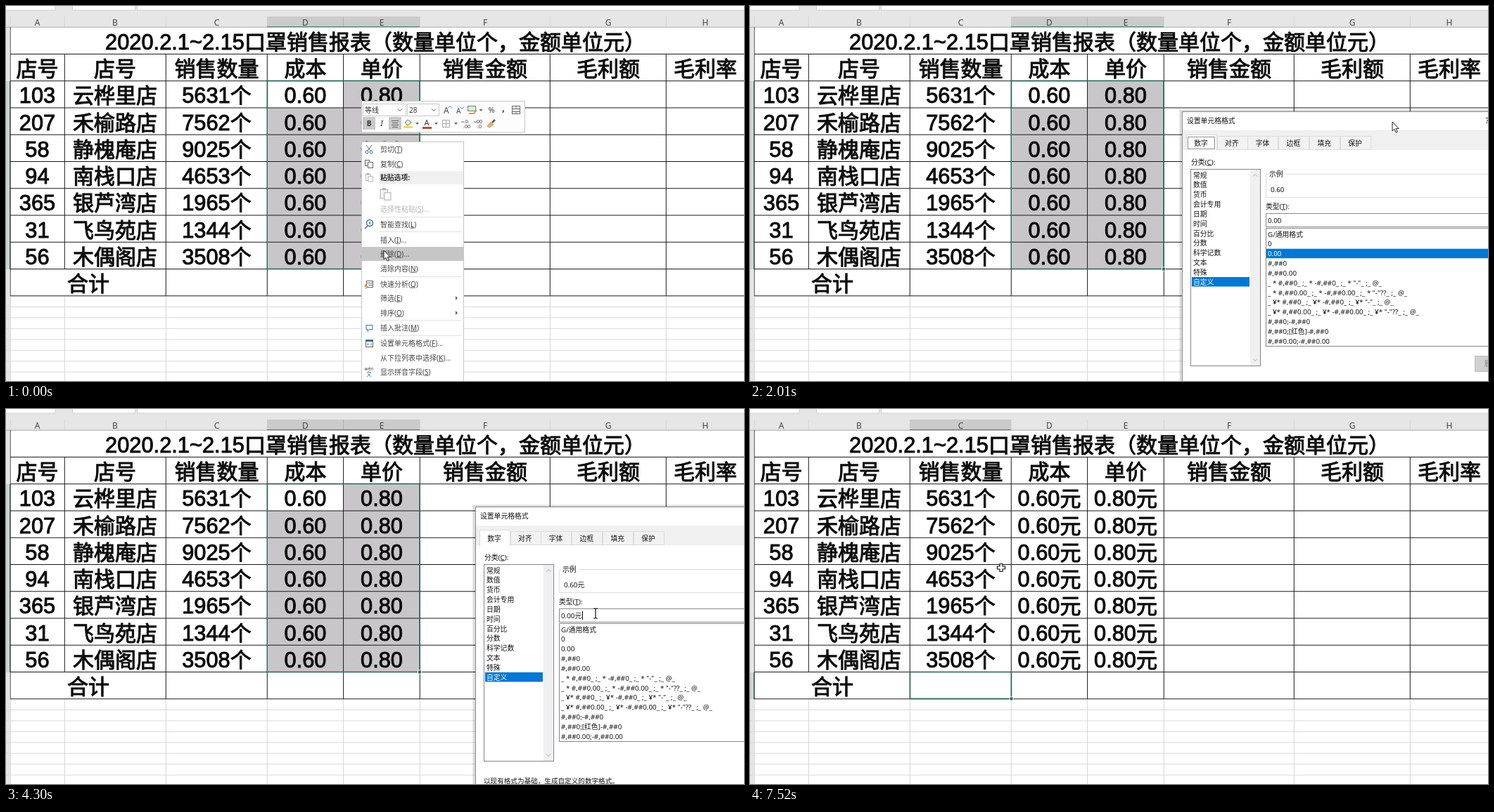
These frames come from a looping animation (1049 px wide and 534 px high, 7.58 s). An HTML page:

```html
<!DOCTYPE html>
<html lang="zh-CN">
<head>
<meta charset="utf-8">
<style>
html, body { margin: 0; width: 100%; height: 100%; overflow: hidden; background: #fff; }
svg { display: block; font-family: "Noto Sans", "Noto Sans CJK SC", "Noto Sans CJK", sans-serif; }
.cell { font-family: "Liberation Sans", "Noto Sans CJK SC", "Noto Sans CJK", sans-serif; stroke: #0c0c0c; stroke-width: 1; }
</style>
</head>
<body>
<svg id="stage" width="1049" height="534" viewBox="0 0 1049 534" fill="none"></svg>
<script>
const LOOP = 7580, GREEN = '#2b6b5b', BLUE = '#0078d7';
const MENU_END = 840, DIALOG_START = 900, DRAG_START = 1670, FOCUS = 3250, TYPED = 3900, OK = 6080, SELECT = 6960;

// Markup helpers; text is placed by its vertical centre.
const rect = (x, y, w, h, fill = 'none', stroke = 'none') =>
  `<rect x="${x}" y="${y}" width="${w}" height="${h}" fill="${fill}" stroke="${stroke}"/>`;
const path = (d, stroke, width = 1, fill = 'none') =>
  `<path d="${d}" stroke="${stroke}" stroke-width="${width}" fill="${fill}"/>`;
const text = (x, y, s, size = 9.8, color = '#111', attrs = '') =>
  `<text x="${x}" y="${y + size * .36}" font-size="${size}" fill="${color}" ${attrs}>` +
  s.replace(/\((\w)\)/, '(<tspan text-decoration="underline">$1</tspan>)') + '</text>';
const middle = 'text-anchor="middle"';
const group = (id, body) => `<g id="${id}">${body}</g>`;
const chevron = (x, y, up, color = '#555') => path(`M${x - 3} ${y + (up ? 1.5 : -1.5)}l3 ${up ? -3 : 3}l3 ${up ? 3 : -3}`, color);

const cols = [6, 83, 227, 371, 479.3, 588, 773, 938, 1051];
const colMid = [44.5, 155, 299.5, 425.5, 534, 681, 856, 994];
const rowY = i => 30.2 + 38.26 * i;
const heads = ['店号', '店号', '销售数量', '成本', '单价', '销售金额', '毛利额', '毛利率'];
const shops = [
  [103, '云桦里店', 5631], [207, '禾榆路店', 7562], [58, '静槐庵店', 9025], [94, '南栈口店', 4653],
  [365, '银芦湾店', 1965], [31, '飞鸟苑店', 1344], [56, '木偶阁店', 3508]];

// Digits sit slightly larger than the Chinese characters beside them.
const cellText = s => String(s).replace(/[\d.~]+/, '<tspan font-size="30.8">$&</tspan>');

function sheet() {
  let s = rect(0, 0, 1049, 534, '#fff') + rect(0, 0, 1049, 30, '#e6e6e6') + rect(0, 30, 6, 504, '#e6e6e6');
  for (const [x, w] of [[-1, 71], [94.5, 89], [186.5, 870]]) s += rect(x, -2, w, 8, '#fff', '#cfcfcf');
  for (let y = 428.5; y < 534; y += 15.45) s += path(`M0 ${y}H1049`, '#dadada');
  for (const x of cols) s += path(`M${x + .3} 413V534M${x + .3} 15V30`, '#d4d4d4');
  s += group('rangeFill',
    rect(371, 15, 217, 15, '#cbcbcb') + path('M479.5 15V30', '#b0b0b0') + path('M371 29.5H588', GREEN) +
    rect(0, 107, 5, 268, '#d2d2d2') + path('M5.5 107V375', GREEN) +
    rect(373, 108, 214, 266, '#c8c6c8') + rect(373, 108, 106, 37, '#fff'));
  s += group('totalFill',
    rect(227, 15, 144, 15, '#cbcbcb') + path('M227 29.5H371', GREEN) +
    rect(0, 375, 5, 38, '#d2d2d2') + path('M5.5 375V413', GREEN));
  s += path('M0 30.2H1049', '#a8a8a8') + path('M6.3 30V413', '#555');
  for (let i = 1; i <= 10; i++) s += path(`M6 ${rowY(i)}H1049`, '#1a1a1a');
  cols.slice(1).forEach((x, i) => s += path(`M${x + .3} ${rowY(1)}V${rowY(i ? 10 : 9)}`, '#1a1a1a'));
  colMid.forEach((x, i) => s += text(x, 23.5, 'ABCDEFGH'[i], 12, '#444', middle));

  const big = (x, row, str, cls = '') =>
    text(x, rowY(row) + 20.8, cellText(str), 30, '#0c0c0c', `${middle} class="cell ${cls}"`);
  s += big(525, 0, '2020.2.1~2.15口罩销售报表（数量单位个，金额单位元）');
  heads.forEach((h, i) => s += big(colMid[i], 1, h));
  shops.forEach(([no, name, count], i) =>
    [no, name, count + '个'].forEach((v, c) => s += big(colMid[c], i + 2, v)));
  for (let i = 2; i < 9; i++) s += big(colMid[3], i, '0.60', 'price') + big(colMid[4], i, '0.80', 'price');
  s += big(117, 9, '合计');

  const edge = (x, y, w, h) =>
    `<rect x="${x}" y="${y}" width="${w}" height="${h}" stroke="${GREEN}" stroke-width="1.6"/>` +
    rect(x + w - 2.5, y + h - 2.5, 5, 5, GREEN, '#fff');
  return s + group('rangeEdge', edge(371.5, 106.5, 216.5, 268)) + group('totalEdge', edge(227.5, 374.5, 144, 38));
}

const menuItems = [
  [204, '剪切(T)'], [225, '复制(C)'], [289, '选择性粘贴(S)...'], [311, '智能查找(L)'], [333, '插入(I)...'],
  [353, '删除(D)...'], [374, '清除内容(N)'], [396, '快速分析(Q)'], [416, '筛选(E)'], [437, '排序(O)'],
  [458, '插入批注(M)'], [480, '设置单元格格式(F)...'], [501, '从下拉列表中选择(K)...'], [521, '显示拼音字段(S)']];

function clipboard(x, y, k, color) {
  return `<g transform="translate(${x} ${y}) scale(${k})">` + rect(0, 2, 9, 11, '#f4f4f4', color) +
    rect(2.5, 0, 4, 3, color) + rect(5, 6, 8, 9, '#fff', color) + '</g>';
}

function menu() {
  const ink = '#666', blue = '#3d6f9e';
  let s = rect(505.5, 135.5, 232, 44.5, '#fdfdfd', '#c6c6c6') +
    rect(507.5, 139.5, 61, 17, '#fff', '#c8c8c8') + text(510, 148, '等线', 10, '#333') + chevron(560, 148) +
    rect(570.5, 139.5, 45, 17, '#fff', '#c8c8c8') + text(573, 148, '28', 10, '#333') + chevron(608, 148) +
    text(622, 148.5, 'A', 12, '#444') + chevron(631, 144, true, blue) +
    text(640, 149, 'A', 10, '#444') + chevron(648, 145, false, blue) +
    rect(656.5, 142.5, 11, 7, '#dcebdc', '#5b8f6a') + path('M658 153h7l4-5', '#d59a45', 2) +
    path('M672.5 147h5l-2.5 3z', 'none', 0, ink) +
    text(690, 148, '%', 11, '#444', middle) + text(707, 145, ',', 14, '#444', middle + ' font-weight="700"') +
    rect(719.5, 142.5, 11, 11, '#fff', ink) + path('M719 146.5h12M719 150.5h12M725 142v4M725 151v3', ink);
  s += rect(507, 158, 18, 18, '#c9c9c9') + text(516, 167, 'B', 10, '#333', middle + ' font-weight="700"') +
    text(534, 167, 'I', 10, '#333', middle + ' font-style="italic" font-family="Noto Serif, serif"') +
    rect(544, 158, 18, 18, '#c9c9c9') + path('M548 163.5h10M549 166.5h8M548 169.5h10M549 172.5h8', ink) +
    path('M567 166l4-4l5 4l-5 4z', ink, 1, '#fff') + rect(565, 171, 13, 3, '#ffd34d') +
    text(598, 166, 'A', 11, '#333', middle) + rect(592, 172, 13, 3, '#c5482f') +
    rect(620.5, 162.5, 10, 10, 'none', '#aaa') + path('M625.5 162v11M620 167.5h11', '#aaa');
  for (const x of [582, 609, 637]) s += path(`M${x} 166h5l-2.5 3z`, 'none', 0, ink);
  for (const [x, top, low] of [[653, '.0', '.00'], [671, '.00', '.0']])
    s += text(x + 1, 164, top, 7, '#333', middle) + text(x + 2, 171, low, 7, '#333', middle) + path(`M${x - 6} 165h4`, blue);
  s += path('M691 166l4-4', '#555', 2.5) + path('M684 171l5-6l4 4l-6 4z', '#d59a45', 1, '#e5b56c');

  s += rect(505.5, 193.5, 145, 360, '#fff', '#c6c6c6') + rect(530, 235, 120, 19, '#f0f0f0') +
    `<rect id="hover" x="506" width="144" height="20" fill="#c6c6c6"/>` +
    text(532, 244.5, '粘贴选项:', 9.8, '#333', 'font-weight="700"');
  for (const y of [300, 321, 385, 447, 469]) s += path(`M532 ${y + .5}H648`, '#e2e2e2');
  for (const [y, label] of menuItems) s += text(532, y, label, 10, y == 289 ? '#b5b5b5' : '#444');
  for (const y of [416, 437]) s += path(`M639 ${y - 3}l3 3l-3 3z`, 'none', 0, ink);
  s += path('M512 198l6 8M520 198l-6 8', ink) +
    `<circle cx="513" cy="208" r="2" stroke="${blue}"/><circle cx="519" cy="208" r="2" stroke="${blue}"/>` +
    rect(510.5, 219.5, 6, 8, '#fff', ink) + rect(514.5, 222.5, 7, 8, '#fff', ink) +
    clipboard(511, 238, .8, '#aaa') + clipboard(532, 259, 1.15, '#b5b5b5') +
    `<circle cx="517" cy="309" r="4.5" stroke="${blue}" stroke-width="1.4"/>` + path('M514 313l-4 4M517 307v4', blue, 1.5) +
    rect(512.5, 391.5, 9, 9, '#fff', ink) + path('M513 394.5h9M515 397.5h6', ink) + path('M513 394l-3 5h3l-2 4', '#d59a45', 1.4) +
    path('M512 454.5h9v6h-5l-2 3v-3h-2z', blue) +
    rect(511.5, 475.5, 10, 10, '#fff', ink) + rect(511, 475, 11, 3, blue) + path('M513 481.5h3M518 481.5h2', ink) +
    text(516, 517, 'wén', 6.5, '#444', middle) + text(516, 524, '文', 7.5, blue, middle);
  return s;
}

const kinds = ['常规', '数值', '货币', '会计专用', '日期', '时间', '百分比', '分数', '科学记数', '文本', '特殊', '自定义'];
const accounting = (sign, num, dash) => `_ ${sign}* ${num}_ ;_ ${sign}* -${num}_ ;_ ${sign}* "-"${dash}_ ;_ @_`;
const formats = ['G/通用格式', '0', '0.00', '#,##0', '#,##0.00',
  accounting('', '#,##0', ''), accounting('', '#,##0.00', '??'),
  accounting('¥', '#,##0', ''), accounting('¥', '#,##0.00', '??'),
  '#,##0;-#,##0', '#,##0;[红色]-#,##0', '#,##0.00;-#,##0.00'];

function dialog() {
  const itemY = i => 13.83 * i;
  let s = `<rect x="-1" y="0" width="493" height="450" stroke="#000" stroke-width="5" opacity=".14"/>` +
    rect(.5, .5, 490, 450, '#fff', '#8c8c8c') + rect(1, 27, 489, 28, '#f0f0f0') +
    text(7, 13, '设置单元格格式') + text(434, 13, '?', 11, '#111', middle) +
    path('M467 9l8 8M475 9l-8 8', '#222');
  ['数字', '对齐', '字体', '边框', '填充', '保护'].forEach((tab, i) => {
    const x = i ? 6 + 43.7 * i : 6;
    s += rect(Math.round(x) + .5, i ? 35.5 : 33.5, 43, i ? 19 : 22, i ? '#f2f2f2' : '#fff', '#dcdcdc');
    s += text(27 + 43.8 * i, 45, tab, 9.8, '#111', middle);
  });
  s += rect(7, 54, 42, 3, '#fff') +
    '<rect id="tabFocus" x="8.5" y="36.5" width="38" height="17" stroke="#222" stroke-dasharray="1 1"/>' +
    text(13, 72, '分类(C):') + rect(12.5, 82.5, 99, 280, '#fff', '#828790') +
    rect(97, 83, 14, 279, '#f0f0f0') + chevron(104, 91, true, '#aaa') + chevron(104, 354, false, '#aaa') +
    rect(14, 236, 82, 13.5, BLUE);
  kinds.forEach((k, i) => s += text(16, 91 + itemY(i), k, 9.8, i == 11 ? '#fff' : '#111'));
  s += rect(119.5, 89.5, 357, 33, 'none', '#dcdcdc') + rect(122, 84, 25, 10, '#fff') + text(124, 89.5, '示例') +
    text(126, 111, '0.60', 9.8, '#111', 'id="sample"') + text(119, 135, '类型(T):') +
    rect(119.5, 145.5, 357, 19, '#fff', '#8a8a8a') + text(122, 155, '0.00', 9.8, '#111', 'id="field"') +
    '<path id="caret" stroke="#000"/>' +
    rect(119.5, 166.5, 358, 168, '#fff', '#828790') + rect(462, 167, 15, 167, '#f0f0f0') +
    rect(464, 182, 11, 31, '#cdcdcd') + chevron(469, 175, true) + chevron(469, 327) +
    `<rect id="picked" x="120" y="195.7" width="342" height="13.5" fill="${BLUE}"/>`;
  formats.forEach((f, i) => s += text(122, 175 + itemY(i), f, 9.8, '#111', `id="format${i}"`));
  return s + rect(416.5, 348.5, 60, 22, '#d0d0d0', '#bdbdbd') + text(446, 359, '删除(D)', 9.8, '#888', middle) +
    text(12, 391, '以现有格式为基础，生成自定义的数字格式。', 9.6);
}

const cursors = {
  arrow: path('M0 0V13L3 10.2L5.2 15.2L7.4 14.2L5.2 9.5H9.2Z', '#222', 1, '#fff'),
  beam: path('M-3-7h2l1 1l1-1h2M0-6V6M-3 7h2l1-1l1 1h2', '#111', 1.2),
  cross: path('M-2-5.5h4v3.5h3.5v4H2v3.5h-4V2h-3.5v-4H-2z', '#111', 1.2, '#fff')
};

const $ = id => document.getElementById(id);
$('stage').innerHTML = sheet() + group('menu', menu()) + group('dialog', dialog()) +
  group('pointer', Object.entries(cursors).map(([id, body]) => group(id, body)).join(''));
const prices = [...document.querySelectorAll('.price')].map(el => [el, el.textContent]);

// Pointer stops: time, x, y
const stops = [
  [0, 537, 348], [80, 537, 348], [620, 560, 473], [1000, 560, 473], [1450, 573, 243], [1510, 573, 243],
  [1640, 616, 196], [DRAG_START, 616, 196], [2010, 913, 165], [2300, 966, 154], [2380, 966, 154],
  [2770, 809, 337], [2900, 809, 337], [3220, 824, 292], [3480, 838, 291], [4440, 838, 291],
  [5080, 1000, 560], [6150, 1000, 560], [6650, 430, 398], [6900, 300, 394], [7120, 300, 394], [7500, 357, 226], [LOOP, 357, 226]];

function pointerAt(t) {
  const i = stops.findIndex(s => s[0] > t);
  const [t0, x0, y0] = stops[i - 1], [t1, x1, y1] = stops[i];
  const p = (t - t0) / (t1 - t0), e = p * p * (3 - 2 * p);
  return [x0 + (x1 - x0) * e, y0 + (y1 - y0) * e];
}

const show = (id, on) => $(id).setAttribute('visibility', on ? 'inherit' : 'hidden');
const move = (id, x, y) => $(id).setAttribute('transform', `translate(${x} ${y})`);

function draw(t) {
  const [x, y] = pointerAt(t);
  move('pointer', x, y);
  const kind = t < 3200 ? 'arrow' : t < 4600 ? 'beam' : t < OK ? 'arrow' : 'cross';
  for (const id in cursors) show(id, id == kind);

  show('menu', t < MENU_END);
  const near = menuItems.reduce((a, b) => Math.abs(b[0] - y - 5) < Math.abs(a[0] - y - 5) ? b : a);
  $('hover').setAttribute('y', near[0] - 10);

  show('dialog', t >= DIALOG_START && t < OK);
  if (t < DRAG_START) move('dialog', 317, 181);
  else if (t < 2300) move('dialog', Math.round(x - 299), Math.round(y - 15));
  else move('dialog', 667, 139);

  const typed = t >= TYPED;
  const unit = typed ? '元' : '';
  $('sample').textContent = '0.60' + unit;
  $('field').textContent = '0.00' + unit;
  show('tabFocus', t < FOCUS);
  show('picked', !typed);
  $('format2').setAttribute('fill', typed ? '#111' : '#fff');
  $('caret').setAttribute('d', `M${typed ? 152.5 : 142.5} 149v12`);
  const blink = (t - (typed ? TYPED : FOCUS)) % 1060 < 530;
  show('caret', t >= FOCUS && t < OK && blink);

  for (const [el, value] of prices) el.innerHTML = cellText(value + (t >= OK ? '元' : ''));
  for (const part of ['Fill', 'Edge']) {
    show('range' + part, t < SELECT);
    show('total' + part, t >= SELECT);
  }
}

const start = performance.now();
function frame() {
  draw((performance.now() - start) % LOOP);
  requestAnimationFrame(frame);
}
frame();
</script>
</body>
</html>
```
